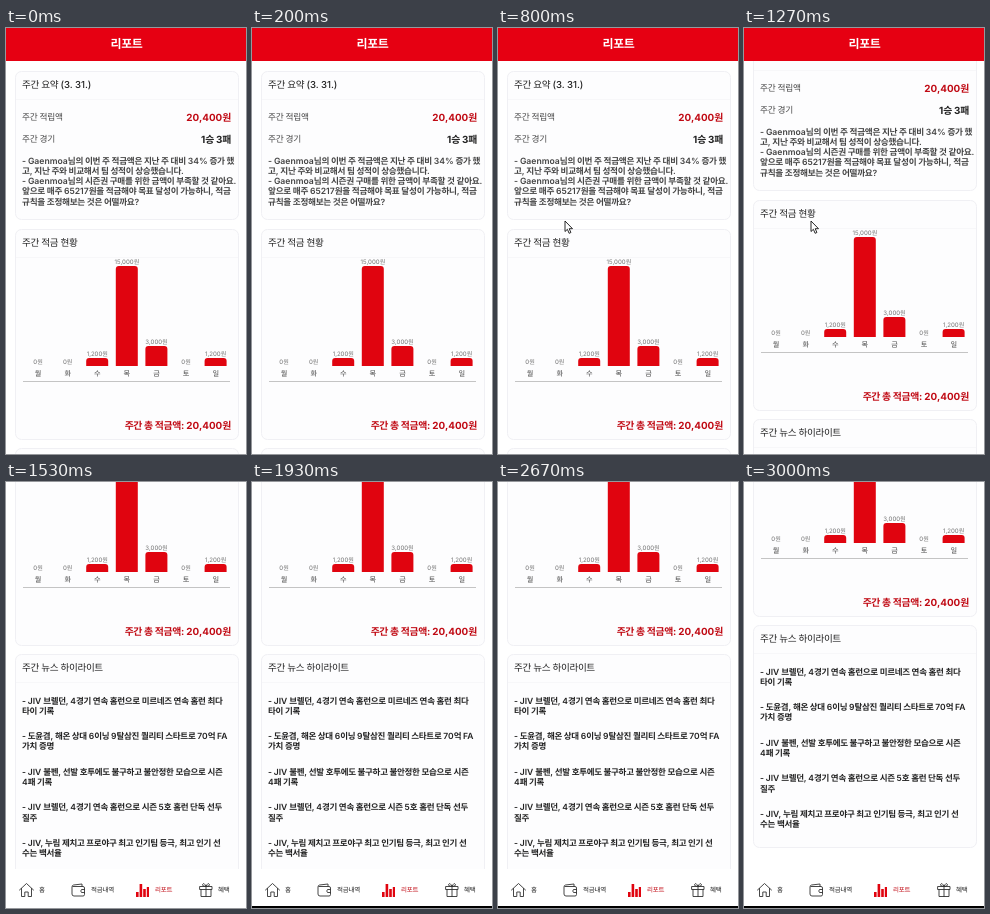
These frames come from a looping animation (240x426 px, 3070 ms). An HTML page:

```html
<!DOCTYPE html>
<html lang="ko">
<head>
<meta charset="utf-8">
<style>
html, body { margin: 0; width: 100%; height: 100%; overflow: hidden; background: #fff; }
svg { display: block; width: 100vw; height: 100vh; }
text { font-family: Inter, "Noto Sans CJK KR", "Noto Sans CJK", sans-serif; letter-spacing: -.035em; text-rendering: geometricPrecision; }
.latin { letter-spacing: 0; }
.icon { fill: none; stroke: #333; stroke-width: .9; stroke-linejoin: round; stroke-linecap: round; }
</style>
</head>
<body>
<svg viewBox="0 0 240 426">
  <clipPath id="view"><rect y="33" width="240" height="573"/></clipPath>
  <rect width="240" height="426" fill="#fff"/>
  <g id="page">
    <g clip-path="url(#view)"><g id="list"></g></g>
    <g id="bars"></g>
  </g>
  <rect id="edge" y="424" width="240" height="2" fill="#000"/>
  <path id="cursor" d="M67 193v10.5l2.4-2.2 1.7 4 1.8-.8-1.7-3.8h3.3z" fill="#fff" stroke="#111" stroke-width=".9" stroke-linejoin="round"/>
</svg>
<script>
const $ = id => document.getElementById(id);
const RED = '#e60012', BAR = '#e0040f', DEEP = '#c00a14', INK = '#222';

// y is the vertical centre of the line; only Hangul is set tight
const text = (x, y, s, size, weight = 400, fill = INK, anchor = 'start') =>
  `<text x="${x}" y="${y + size * .36}" font-size="${size}" font-weight="${weight}" fill="${fill}" text-anchor="${anchor}">` +
  s.replace(/[!-~]+/g, '<tspan class="latin">$&</tspan>') + '</text>';

const card = (top, bottom, title) =>
  `<rect x="9.5" y="${top + .5}" width="223" height="${bottom - top}" rx="6" fill="#fdfdfe" stroke="#f0f0f4"/>
   <path d="M10 ${top + 28.5}H232" stroke="#f7f7f9"/>` + text(16, top + 14, title, 9.6, 500);

const row = (y, label, value, fill) =>
  text(16, y, label, 8.7, 400, '#444') + text(225, y, value, 9.9, 700, fill, 'end');

const summary = [
  '- Gaenmoa님의 이번 주 적금액은 지난 주 대비 34% 증가 했',
  '고, 지난 주와 비교해서 팀 성적이 상승했습니다.',
  '- Gaenmoa님의 시즌권 구매를 위한 금액이 부족할 것 같아요.',
  '앞으로 매주 65217원을 적금해야 목표 달성이 가능하니, 적금',
  '규칙을 조정해보는 것은 어떨까요?'
];
const savings = [0, 0, 1200, 15000, 3000, 0, 1200];
const news = [
  ['- JIV 브렐던, 4경기 연속 홈런으로 미르네즈 연속 홈런 최다', '타이 기록'],
  ['- 도윤겸, 해온 상대 6이닝 9탈삼진 퀄리티 스타트로 70억 FA', '가치 증명'],
  ['- JIV 불펜, 선발 호투에도 불구하고 불안정한 모습으로 시즌', '4패 기록'],
  ['- JIV 브렐던, 4경기 연속 홈런으로 시즌 5호 홈런 단독 선두', '질주'],
  ['- JIV, 누림 제치고 프로야구 최고 인기팀 등극, 최고 인기 선', '수는 백서율']
];

const bar = (won, i) => {
  const x = 32 + i * 29.6, h = won / 150, top = 338 - h;
  const shape = won ? `<path d="M${x - 11} 338v${3 - h}q0-3 3-3h16q3 0 3 3v${h - 3}z" fill="${BAR}"/>` : '';
  return shape + text(x, top - 4, won.toLocaleString('en-US') + '원', 6.1, 400, '#777', 'middle') +
    text(x, 345.5, '월화수목금토일'[i], 7.2, 400, '#444', 'middle');
};

$('list').innerHTML =
  card(43, 191, '주간 요약 (3. 31.)') +
  row(89, '주간 적립액', '20,400원', DEEP) +
  row(111, '주간 경기', '1승 3패', INK) +
  summary.map((s, i) => text(16, 132.7 + i * 10.2, s, 8.65, 600, '#444')).join('') +
  card(201, 411, '주간 적금 현황') +
  savings.map(bar).join('') +
  '<path d="M17 353.5H224" stroke="#c4c4c4"/>' +
  text(225, 397, '주간 총 적금액: 20,400원', 9.9, 700, DEEP, 'end') +
  card(420, 642, '주간 뉴스 하이라이트') +
  news.map((lines, i) => lines.map((s, j) =>
    text(16, 466.5 + i * 35.6 + j * 10.3, s, 8.5, 600, INK)).join('')).join('');

const icon = (x, d) => `<path class="icon" transform="translate(${x} 627)" d="${d}"/>`;
$('bars').innerHTML =
  `<rect width="240" height="33" fill="${RED}"/>` + text(120.5, 16, '리포트', 12, 700, '#fff', 'middle') +
  '<rect y="606" width="240" height="40" fill="#fff"/>' +
  icon(20.5, 'M-7 0L0-6.5 7 0M-5-1.5V6.5H-1.7V2H1.7V6.5H5V-1.5') +
  icon(72, 'M4-3.5V-6L-4.5-5Q-6-4.7-6-3V4Q-6 6-4 6H5Q6.5 6 6.5 4.5V-2Q6.5-3.5 5-3.5H-5M6.5-.5H3.5Q2 1 3.5 2.5H6.5') +
  `<path d="M130 629h2.6v5H130zM133.6 621h2.6v13h-2.6zM137.2 626h2.6v8h-2.6zM140.8 624h2.2v10h-2.2z" fill="${BAR}"/>` +
  icon(200, 'M-6-3.5H6V-.5H-6zM-5-.5V6.5H5V-.5M0-3.5V6.5M0-3.5Q-4-3.5-3.5-5.5-2-8 0-3.5 2-8 3.5-5.5 4-3.5 0-3.5') +
  [[33, '홈'], [85, '적금내역'], [149, '리포트', DEEP], [212, '혜택']]
    .map(([x, s, fill]) => text(x, 627, s, 6.5, 500, fill)).join('');

// eased progress from a to b
const ease = (t, a, b) => {
  const p = Math.min(1, Math.max(0, (t - a) / (b - a)));
  return p * p * (3 - 2 * p);
};
const shift = (id, y) => $(id).setAttribute('transform', `translate(0 ${-Math.round(y)})`);
const show = (id, on) => $(id).style.display = on ? '' : 'none';

const start = performance.now();
function draw() {
  const t = (performance.now() - start) % 3070;
  shift('list', 29 * ease(t, 1070, 1260) + 29 * ease(t, 2700, 2930));
  shift('page', 219 * ease(t, 1290, 1510));
  show('cursor', t >= 330 && t < 1330);
  show('edge', t >= 1570);
  requestAnimationFrame(draw);
}
draw();
</script>
</body>
</html>
```
